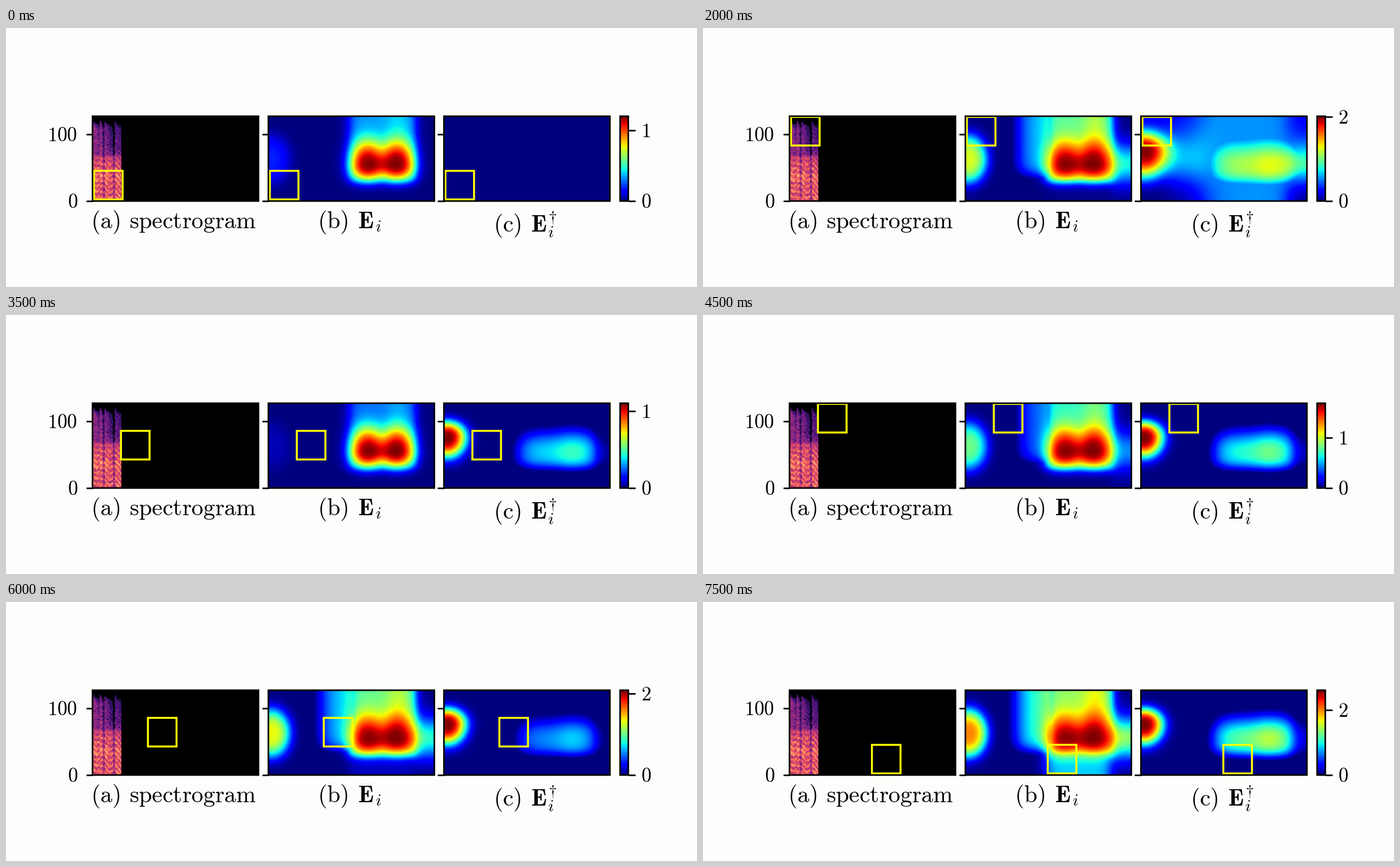
A matplotlib script for the animation above (8000 ms loop, 1222 by 458 pixels).

```python
import numpy as np
import matplotlib.pyplot as plt
from matplotlib.animation import FuncAnimation
from matplotlib.patches import Rectangle

plt.rcParams["mathtext.fontset"] = "cm"

W, H = 1222, 458
PT = 0.72                      # points per pixel at 100 dpi
STEPS, STEP_MS = 16, 500
TOP, BOTTOM = 156, 306
PANELS = (153, 464, 774.5)
PANEL_W = 293.5
CELL, STRIDE = 50.6, 47.7

fig = plt.figure(figsize=(W / 100, H / 100), dpi=100, facecolor="#fdfdfc")
ax = fig.add_axes([0, 0, 1, 1])
ax.set(xlim=(0, W), ylim=(H, 0))
ax.axis("off")


def text(x, y, s, size):
    return ax.text(x, y, f"${s}$", fontsize=size * PT, color="black",
                   ha="left", va="baseline")


def line(x0, x1, y):
    return ax.plot([x0, x1], [y, y], color="black", lw=2.8 * PT,
                   solid_capstyle="butt", zorder=4)[0]


def frame(x, w):
    ax.add_patch(Rectangle((x, TOP), w, BOTTOM - TOP, fill=False,
                           ec="black", lw=2.8 * PT, zorder=4, snap=False))


def picture(data, x, w, cmap, **kw):
    return ax.imshow(data, extent=(x, x + w, BOTTOM, TOP), cmap=cmap,
                     vmin=0, vmax=1, aspect="auto", zorder=1, **kw)


def sig(v):
    return 1 / (1 + np.exp(-v))


def bell(v, s):
    return np.exp(-0.5 * (v / s) ** 2)


def relu(v):
    return np.maximum(v, 0)


def spectrogram():
    """Four decaying onsets with wavy harmonics, bottom row first."""
    rng = np.random.default_rng(4)
    f, c = np.mgrid[0:128, 0:44].astype(float)
    noise = rng.normal(0, 1, (128, 44))
    noise = (noise + np.roll(noise, 1, 0) + np.roll(noise, 1, 1)) / 1.7
    starts = np.array([1, 11, 18, 34])
    last = starts[np.clip(np.searchsorted(starts, c, "right") - 1, 0, 3)]
    age = relu(c - last)
    level = 0.66 - 0.0008 * f - 0.17 * sig((f - 67) / 1.5)
    level -= (0.003 + 0.010 * sig((f - 75) / 8)) * age
    bend = 4 * np.sin(c / 3.2) + 0.35 * age
    level += 0.10 * np.sin(2 * np.pi * (f + bend) / 8.5) * sig((68 - f) / 4)
    level += 0.12 * bell(f - 36, 6) * bell(age - 2, 3)
    for gap in (16.5, 32.5):
        level -= 0.22 * bell(c - gap, 1.1)
    level -= 0.10 * sig((c - 22) / 3) * sig((f - 70) / 5)
    level -= 0.6 * sig((f - 117 - 5 * bell(age, 1.5)) / 2.5)
    return np.clip(level + 0.06 * noise, 0, 1)


# Pixel coordinates inside a panel.
yy, xx = np.mgrid[TOP + 0.5:BOTTOM, 0.5:293]


def core_field():
    dy = yy - 241
    ry = dy / np.where(dy < 0, 42, 29)
    lobes = [np.exp(-np.hypot((xx - cx) / 32, ry) ** 2.6) for cx in (175, 226)]
    both = (lobes[0] ** 1.5 + lobes[1] ** 1.5) ** (1 / 1.5)
    return both / both.max()


# Parts of the second panel.
CORE = core_field()
COLUMN = (sig((xx - 143) / 6) * sig((260 - xx) / 5) * sig((272 - yy) / 5)
          * (0.74 + 0.15 * bell(xx - 229, 16) * sig((215 - yy) / 12)
             + 0.26 * bell(yy - 244, 32)))
LEFT = np.exp(-np.hypot((xx - 5) / 34, (yy - 232) / 43) ** 3.2)
WING = sig((xx - 90) / 13) * sig((146 - xx) / 6) * sig((263 - yy) / 8)
RIGHT = sig((xx - 258) / 5) * bell(yy - 240, 26)
FLOOR = sig((xx - 143) / 6) * sig((255 - xx) / 6) * sig((yy - 274) / 4)


def map_b(top):
    """Spread over the panel grows with the colour-bar maximum."""
    u = top - 0.75
    v = (0.75 * CORE + u * COLUMN
         + relu(1.3 * u - 0.4) * LEFT
         + relu(0.8 * u * WING - 0.34)
         + relu(u - 0.5) * RIGHT
         + relu(1.4 * u - 1.75) * FLOOR)
    return v / v.max()


# Parts of the third panel.
DY = yy - 241
RIDGE = (sig((xx - 126) / 13) * (0.4 + 0.6 * sig((266 - xx) / 7))
         * np.where(DY < 0, np.exp(-(DY / 46) ** 2),
                    np.exp(-(np.abs(DY) / 36) ** 3))
         * (0.87 + 0.13 * bell(xx - 226, 20)))
DROP = (sig((xx - 258) / 9) * (1 - bell(yy - 236, 30))
        * (0.6 + 0.4 * sig((yy - 236) / 5)))
HAZE = (0.28 * sig((xx - 108) / 16) * (1 - DROP)
        + 0.3 * bell(yy - 232, 32) * sig((xx - 45) / 9) * sig((112 - xx) / 14)
        + 0.17 * bell(yy - 240, 22) * sig((xx - 262) / 8)
        + 0.11 * sig((205 - yy) / 12) * sig((125 - xx) / 15))


def map_c(ridge, haze):
    """Blob on the left, ridge on the right, haze in between."""
    dy = yy - 216 - 4 * haze
    r = np.hypot((xx - 5) / 34, dy / np.where(dy < 0, 28, 36))
    blob = np.exp(-(r / (1 + 0.25 * haze)) ** 2.8)
    v = blob + relu(ridge * RIDGE - 0.2) + haze * HAZE
    return v / v.max()


# Key values over the steps.
TOPS = ([0, 2, 4, 7, 10, 11, 12, 13, 14, 15],
        [1.2, 0.745, 2.01, 1.1, 1.98, 1.97, 2.08, 2.04, 2.003, 2.62])
RIDGES = ([4, 7, 10, 12, 15], [0.57, 0.62, 0.72, 0.53, 0.77])
HAZES = ([4, 7], [1, 0])

# Static parts.
ax.add_patch(Rectangle((PANELS[0], TOP), PANEL_W, BOTTOM - TOP, fc="black",
                       ec="none"))
picture(spectrogram(), PANELS[0], 51, "magma", origin="lower",
        interpolation="nearest")
picture(np.linspace(1, 0, 150)[:, None], 1086, 15, "jet")
frame(1086, 14.5)
for px in PANELS:
    frame(px, PANEL_W)
    for ty in (188, BOTTOM):
        line(px - 11.5, px, ty)

text(73, 200, "100", 35)
text(109, 318, "0", 35)
text(149.5, 354, r"\mathrm{(a)}", 41.8)
text(217.7, 354, r"\mathrm{spectrogram}", 41.8)
for px, ex, base, tag in ((551, 621.5, 354, "b"), (862, 927.5, 360, "c")):
    text(px, base, rf"\mathrm{{({tag})}}", 41.8)
    text(ex, base, r"\mathbf{E}", 41.8)
text(653, 360, "i", 29)
text(958, 370, "i", 29)
text(959, 343, r"\dagger", 29)

# Moving parts.
img_b = picture(np.zeros(xx.shape), PANELS[1], PANEL_W, "jet")
img_c = picture(np.zeros(xx.shape), PANELS[2], PANEL_W, "jet")
cells = [ax.add_patch(Rectangle((0, 0), CELL, CELL, fill=False, ec="#ffff00",
                                lw=3.5 * PT, zorder=3, snap=False))
         for _ in PANELS]
for cell, px in zip(cells, PANELS):
    clip = Rectangle((px, TOP), PANEL_W, BOTTOM - TOP,
                     transform=ax.transData)
    cell.set_clip_path(clip)
line(1101, 1112.5, BOTTOM)
high_tick = line(1101, 1112.5, BOTTOM)
low_label = text(1123, 318, "0", 35)
high_label = text(1123, 318, "1", 35)


def draw(n):
    col, row = divmod(n * 3 // 5, 3)
    for cell, px in zip(cells, PANELS):
        cell.set_xy((px + 2.6 + STRIDE * col, 252.6 - STRIDE * row))

    top = np.interp(n, *TOPS)
    img_b.set_data(map_b(top))
    if n == 0:
        img_c.set_data(np.zeros(xx.shape))
    else:
        img_c.set_data(map_c(np.interp(n, *RIDGES), np.interp(n, *HAZES)))

    tick = 0.5 if top < 1 else 1 if top < 2 else 2
    y = BOTTOM - (BOTTOM - TOP) * tick / top
    high_tick.set_ydata([y, y])
    high_label.set_y(y + 12)
    high_label.set_text(f"${tick}$")
    low_label.set_text("$0.0$" if top < 1 else "$0$")
    return [img_b, img_c, *cells, high_tick, low_label, high_label]


anim = FuncAnimation(fig, draw, frames=STEPS, interval=STEP_MS,
                     repeat=True, repeat_delay=0, blit=False)
plt.show()
```
